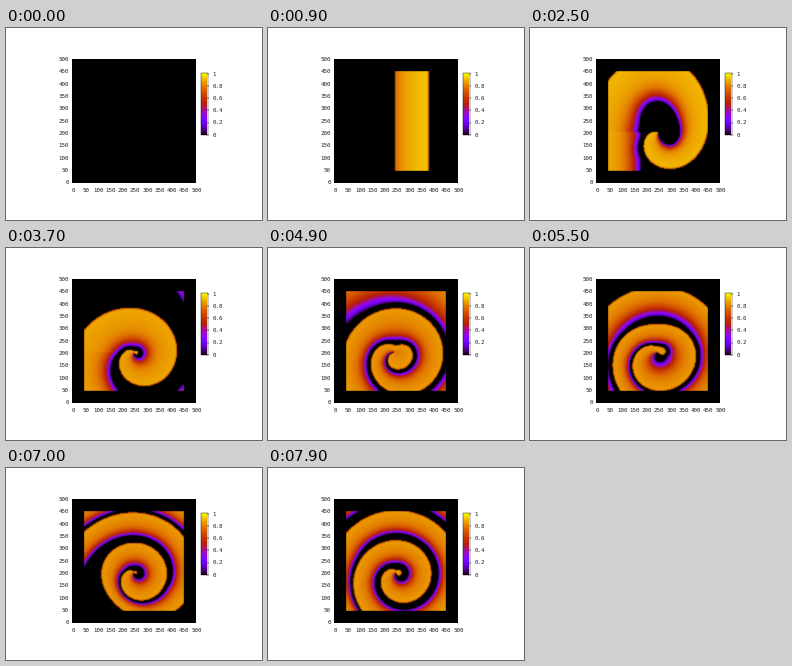
A matplotlib script for the animation above (8 s loop, 256 px wide and 192 px high).

```python
import numpy as np
import matplotlib.pyplot as plt
from matplotlib.animation import FuncAnimation
from matplotlib.colors import ListedColormap
from matplotlib.patches import Rectangle

W, H, DPI = 256, 192, 100
FRAMES, STEP = 80, 100            # 80 frames of 100 ms
N = 100                           # excitable square, one cell per pixel
LEFT, TOP = 78, 43
CX, CY = 50, 61                   # rotation centre inside the square
R0 = 30                           # radius to which front_time refers
TURNS = 9
SPEED, SLOW = 0.047, 0.036        # pixels per ms in rested and in tired tissue
NEVER = -1e9


def bump(m, centre, width):
    return np.exp(-((m - centre) / width) ** 2)


def front_time(m):
    """Time (ms) the front passes R0, m in eighths of a clockwise turn."""
    base = 1650 + 155 * np.minimum(m, 16) + 104 * np.clip(m - 16, 0, None)
    swing = 220 * np.cos(np.pi / 4 * (m - 1.2))       # off-centre core
    start = -620 * bump(m, 1.9, 1.4)                  # free end of the half wave
    drift = (200 * bump(m, 26, 1.5) - 250 * bump(m, 31, 1.5)
             + 400 * bump(m, 38.5, 1.6))              # the tip wanders upwards
    return base + swing + start + drift


def activation_times():
    """Arrival time of every wave at every cell, first wave first."""
    j, i = np.mgrid[0:N, 0:N] + 0.5
    dx, dy = i - CX, j - CY
    r = np.hypot(dx, dy)
    eighth = np.mod(np.arctan2(-dy, -dx), 2 * np.pi) * 4 / np.pi

    # plane wave to the right, then a half plane wave to the left
    to_right = 180 + (dx + 1) / SPEED
    to_left = np.where(dy > 0, 1100 - dx / SPEED, NEVER)
    waves = [np.full((N, N), 2 * NEVER), np.where(dx > -1, to_right, to_left)]
    for n in range(TURNS):
        m = eighth + 8 * n
        t = front_time(m) + (r - R0) / np.interp(m, [8, 16], [SPEED, SLOW])
        waves.append(np.maximum(t, waves[-1] + 200 if n else 1100))
    return np.array(waves), r, eighth


def durations(arrive, r, eighth):
    """How long each wave keeps a cell excited; it ends before the next front."""
    gap = np.concatenate([np.diff(arrive, axis=0), np.full((1, N, N), 700.0)])
    cap = np.interp(arrive, [3500, 5200], [1180, 620])
    cap[1] = 1000
    # the first turn is cut short where the plane wave has just passed
    cap[2] = 1000 - 480 * bump(eighth, 4.6, 2) * np.clip((70 - r) / 50, 0, 1)
    last = np.clip(np.minimum(0.84 * gap, cap), 200, None)
    last[1] = np.where(arrive[1] < 1099, 960, last[1])
    return last


ARRIVE, RADIUS, EIGHTH = activation_times()
LAST = durations(ARRIVE, RADIUS, EIGHTH)


def potential(t):
    k = (ARRIVE <= t).sum(axis=0)[None] - 1
    start = np.take_along_axis(ARRIVE, k, 0)[0]
    age = t - start
    s = np.clip(age / np.take_along_axis(LAST, k, 0)[0], 0, 1.04)
    peak = np.interp(start, [1500, 4500], [0.92, 0.85])
    rise = np.clip(0.75 + age / 160, 0, 1)
    return rise * (peak - 0.1 * s) * (1 - (s / 1.04) ** 6)


def soften(rgb):
    """Small blur of the colours; the surroundings are black."""
    p = np.pad(rgb, ((1, 1), (1, 1), (0, 0)))
    p = 0.64 * p[1:-1] + 0.18 * (p[:-2] + p[2:])
    return 0.64 * p[:, 1:-1] + 0.18 * (p[:, :-2] + p[:, 2:])


v = np.linspace(0, 1, 256)
heat = ListedColormap(np.column_stack(
    [np.sqrt(v), v ** 3, np.clip(np.sin(2 * np.pi * v), 0, 1)]))


def picture(t):
    return np.clip(soften(heat(potential(t))[:, :, :3]), 0, 1)


fig = plt.figure(figsize=(W / DPI, H / DPI), dpi=DPI, facecolor="white")
ax = fig.add_axes([0, 0, 1, 1])
ax.axis("off")
ax.add_patch(Rectangle((66.3, 31.3), 123.5, 123.5, fc="black", lw=0))
field = ax.imshow(picture(0), interpolation="nearest", zorder=2,
                  extent=(LEFT, LEFT + N, TOP + N, TOP))
ax.imshow(v[::-1, None], cmap=heat, vmin=0, vmax=1, interpolation="nearest",
          extent=(195, 201, 107, 45), aspect="auto", zorder=2)
ax.add_patch(Rectangle((195, 45), 6.5, 62, fc="none", ec="black", lw=0.3, zorder=3))
ax.set_xlim(0, W)
ax.set_ylim(H, 0)
ax.set_aspect("auto")


def label(x, y, text, ha):
    ax.text(x, y, text, ha=ha, va="center_baseline", color="#222222",
            family="DejaVu Sans Mono", size=5.9 * 72 / DPI)


for n in range(11):
    label(67.8 + 12.27 * n, 162.5, str(50 * n), "center")
    label(63, 154.5 - 12.35 * n, str(50 * n), "right")
for n in range(6):
    y = 106.7 - 12.2 * n
    label(206.5, y, f"{n / 5:g}", "left")
    ax.plot([201, 203], [y, y], color="black", lw=0.3)


def update(frame):
    field.set_data(picture(frame * STEP))
    return [field]


def reset():
    return update(0)


anim = FuncAnimation(fig, update, frames=FRAMES, init_func=reset,
                     interval=STEP, repeat=True, repeat_delay=0)
plt.show()
```
